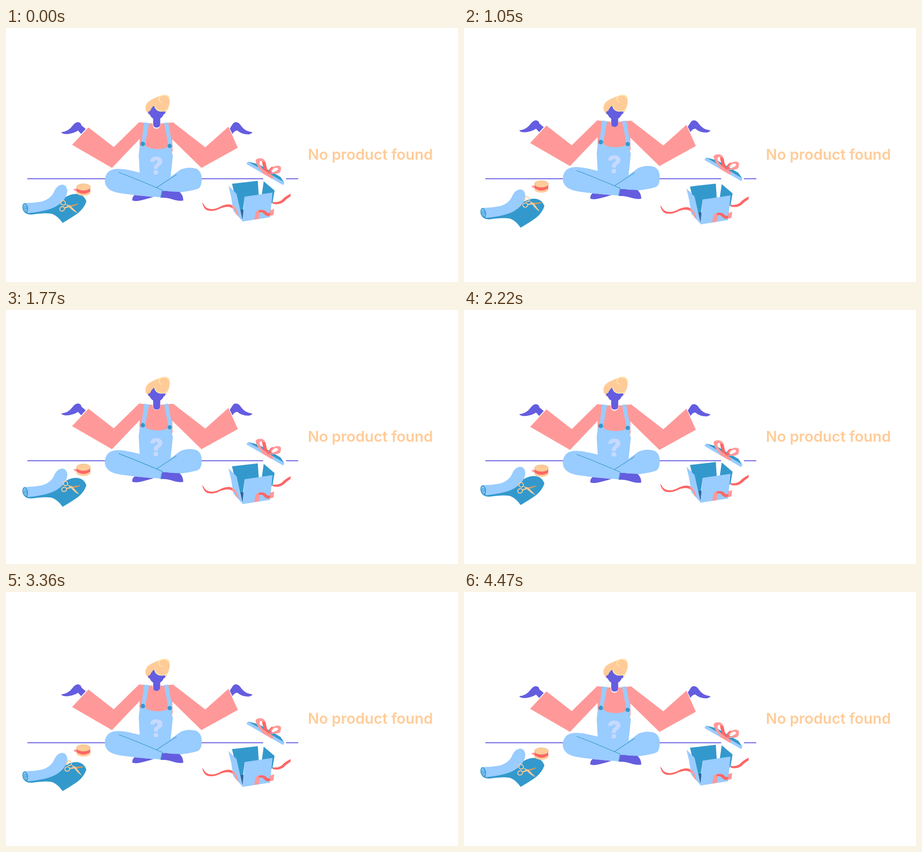
These frames come from a looping animation (998x561 px, 4500 ms). An HTML page:

```html
<!DOCTYPE html>
<html lang="en">
<head>
<meta charset="utf-8">
<title>No product found</title>
<style>
  html, body { margin: 0; width: 100%; height: 100%; overflow: hidden; background: #fff; }
  svg { display: block; width: 998px; height: 561px; }
  text { font-family: Inter, sans-serif; }
  .sky { fill: #9cf; }
  .sea { fill: #39c; }
  .navy { fill: #369; }
  .pink { fill: #f99; }
  .red { fill: #f66; }
  .peach { fill: #fc9; }
  .violet { fill: #645de0; }
  .line { fill: none; stroke-linecap: round; stroke-linejoin: round; }
</style>
</head>
<body>
<svg viewBox="0 0 998 561">
  <path class="line" stroke="#645de0" stroke-width="2" d="M48 333H567M619 333H644.500"/>
  <text class="peach" x="666.500" y="291" font-size="32.600" font-weight="600">No product found</text>

  <g id="head">
    <path class="peach" d="M316 192L309 183Q305 171 314 163Q323 156 339 150.500Q354 144 360 152Q363 159 360 172L353 188Z"/>
    <g class="violet">
      <circle cx="317.500" cy="187" r="3.500"/>
      <circle cx="348" cy="187" r="3.500"/>
      <path d="M318 184Q322 173 329 171L349 178V188Q347 196 340.500 200V212Q340.500 220 332.500 220Q325 220 325 212V200Q318 196 317 188Z"/>
    </g>
    <path class="peach" d="M328 170Q330 183 343 184Q352 184 357 180L361 160L340 155Z"/>
    <path class="line" stroke="#fff0b0" stroke-width="1.600" d="M328 171Q330 183 343 184Q352 184 357 180M343 164Q336 161 338 154Q342 147 350 148.500Q358 149 361 157"/>
  </g>

  <g id="body">
    <g class="violet">
      <path d="M122 230Q137 229 146 217Q153 207.500 159 208Q166 209 166.500 215L176 223L166 234L159 226.500Q151 232 138 234Q124 235 122 230Z"/>
      <path d="M494 222L500 213Q503 207.500 508 208Q514 208 519 216Q527 228 543 230Q546 232 536 235Q520 235 511 226.500Q505 226 500 234Z"/>
      <path d="M279 381Q278 373 284 369L326 373Q306 379 294 381.500Q284 383 279 381Z"/>
    </g>
    <path class="pink" d="M294 208L324 211V214Q325 222.500 332.500 222.500Q341 222 341 211L369 208.500L440 263.500L491 218L512 264.500L431.500 309L367 246L368 270L364 285H298L295 265V245L234 309L146 258L182 219.500L238 263Z"/>
    <path class="sky" d="M295 263L299 256L305 208.500L316 210L307 259Q314 267 336 267.500Q354 267 359 260L349 209.500L358 208.500L367 257L366 276L368.500 281L361 352H297L293 281Z"/>
    <g class="sea">
      <circle cx="302" cy="256" r="5"/>
      <circle cx="361.500" cy="260.500" r="4.700"/>
    </g>
    <text x="332" y="323.500" font-size="52" font-weight="900" text-anchor="middle" fill="#c6d9ff">?</text>
    <path class="sky" d="M331 353L385 313Q404 305 421 311Q433 318 432 335Q432 351 424 355Q400 363 346 366Z"/>
    <path class="sky" d="M218 337Q220 311 247 311Q263 311 297 320L345 356L342 374Q270 369 243 363Q219 357 218 337Z"/>
    <path class="violet" d="M342 375L345 360Q352 359 361 361L383 362Q391 368 391.500 381Q384 383 373 380Q355 374 342 375Z"/>
    <path class="line" stroke="#39c" stroke-width="1.300" d="M249 319Q282 331 345 358L341.500 374M333 352L376 324"/>
  </g>

  <g id="cloth">
    <path class="sea" d="M36.500 398Q40 413 57 412Q92 407 103 411Q115 416 125 430.500Q148 417 160 408Q173 397 177.500 383Q172 367 155 366.500Q144 366 132 373L60 400Z"/>
    <path class="sky" d="M40 386.500Q60 387 80 383Q99 377 106 362Q112 347 124 346Q134 346 135.500 360Q134 378 115 391Q98 404 48 409Z"/>
    <ellipse cx="42.500" cy="397.500" rx="5" ry="9.500" transform="rotate(-12 42.500 397.500)" fill="#9cf" stroke="#39c" stroke-width="2"/>
    <path class="line" stroke="#39c" stroke-width="1.300" d="M45 404Q40 402 40 395Q43 390 46 398Q45 403 42.500 397"/>
  </g>

  <g id="scissors">
    <g class="line" stroke="#fc9" stroke-width="2">
      <ellipse cx="126" cy="386" rx="5.500" ry="4.800" transform="rotate(40 126 386)"/>
      <ellipse cx="124" cy="399.500" rx="5.500" ry="4.800" transform="rotate(-25 124 399.500)"/>
    </g>
    <path fill="#c96" d="M138 392.500L160 387.500Q158 392 141 395.500Z"/>
    <path class="peach" d="M129 396.500L139 392L141 395L130 398.500ZM130 388.500L142 392.500L158 408.500Q149 406 139 395.500Z"/>
  </g>

  <g id="spool">
    <path class="pink" d="M149 356L158 354V361L152 360Z"/>
    <ellipse class="peach" cx="171" cy="363" rx="15.500" ry="7.500"/>
    <path class="red" d="M156 353H186V361Q171 371 156 361Z"/>
    <ellipse cx="171" cy="351.500" rx="15.500" ry="7.500" fill="#fc9" stroke="#d9a066" stroke-width=".6"/>
  </g>

  <g id="box">
    <path class="red" d="M589 384Q600 386 609 380Q617 371 629 366L628 372Q620 377 613 384Q602 392 589 388Z"/>
    <path class="red" d="M433 385L437 390Q441 400 456 400Q466 399 476 393Q493 386 502 393L511 402L508 409Q502 395 490 395Q480 395 470 400Q457 406 445 403Q436 400 433 385Z"/>
    <path class="sea" d="M499 344L556 337.500L558 369L527 373L522 410L510 390ZM569 338.500L593 359L588 388L565 367Z"/>
    <path class="navy" d="M517 401H525L522 426Z"/>
    <path class="sky" d="M491 348L509 366L523 427.500L502 404L497 373ZM527 372.500L588.500 363.500L583 418L522 427.500Z"/>
    <path class="pink" d="M499 392Q511 396 513 416L508 411Q507 401 499 396ZM548 423L551 407Q556 400 569 402L561 408L558 421.500Z"/>
    <path class="red" d="M558 403Q570 399 577 408Q584 411 589 402L590 409Q580 420 571 412Q566 405 558 407Z"/>
    <path class="pink" d="M582 403L592 399.500L591 412Q587 416 581 414Q586 409 582 403Z"/>
  </g>

  <g id="lid">
    <path class="sea" d="M534 295L558 301L606 329L614 341Z"/>
    <path class="sky" d="M534 295L615 341.500L612 347L531 300.500Z"/>
    <path class="pink" d="M568 315L579 319L590 327L588 333.500L565 320Z"/>
    <path class="red" d="M565 291Q572 288 574.500 303Q576 314 582 320L575 322Q566 309 565 291ZM579 321Q579 311 588 306L593 309Q585 314 584 323Z"/>
    <path class="pink" d="M551 293Q553 287 564 288Q571 289 572 297Q565 292 560 295Q558 306 578 320L574 323Q555 312 551 293ZM584 313Q590 304 601 304Q609 305 607 312Q606 320 603 320Q594 324 580 321Q598 317 601 312Q600 307 594 309Q588 311 584 318Z"/>
  </g>
</svg>
<script>
  const LOOP = 4500, LEG = LOOP / 4;
  // Positions at each quarter of the loop, joined with sine easing.
  const tracks = {
    body: [0, -4, 0, -4, 0],
    cloth: [0, 10.7, .2, 9.2, 0],
    scissors: [0, -6, 0, -6, 0],
    spool: [0, -7, -2, -7, 0],
    box: [0, 6.2, -1.8, 3, 0],
    lid: [0, -9, 0, -9, 0]
  };
  const parts = Object.entries(tracks).map(([id, keys]) => [document.getElementById(id), keys]);

  function valueAt(keys, time) {
    const leg = Math.floor(time / LEG);
    const ease = (1 - Math.cos(Math.PI * (time / LEG - leg))) / 2;
    return keys[leg] + (keys[leg + 1] - keys[leg]) * ease;
  }

  function draw() {
    const time = performance.now() % LOOP;
    for (const [part, keys] of parts) {
      const y = valueAt(keys, time);
      const move = part.id === "scissors"
        ? `translate(${-2 * y} ${y}) rotate(${-1.5 * y} 140 394)`
        : `translate(0 ${y})`;
      part.setAttribute("transform", move);
    }
    requestAnimationFrame(draw);
  }
  draw();
</script>
</body>
</html>
```
